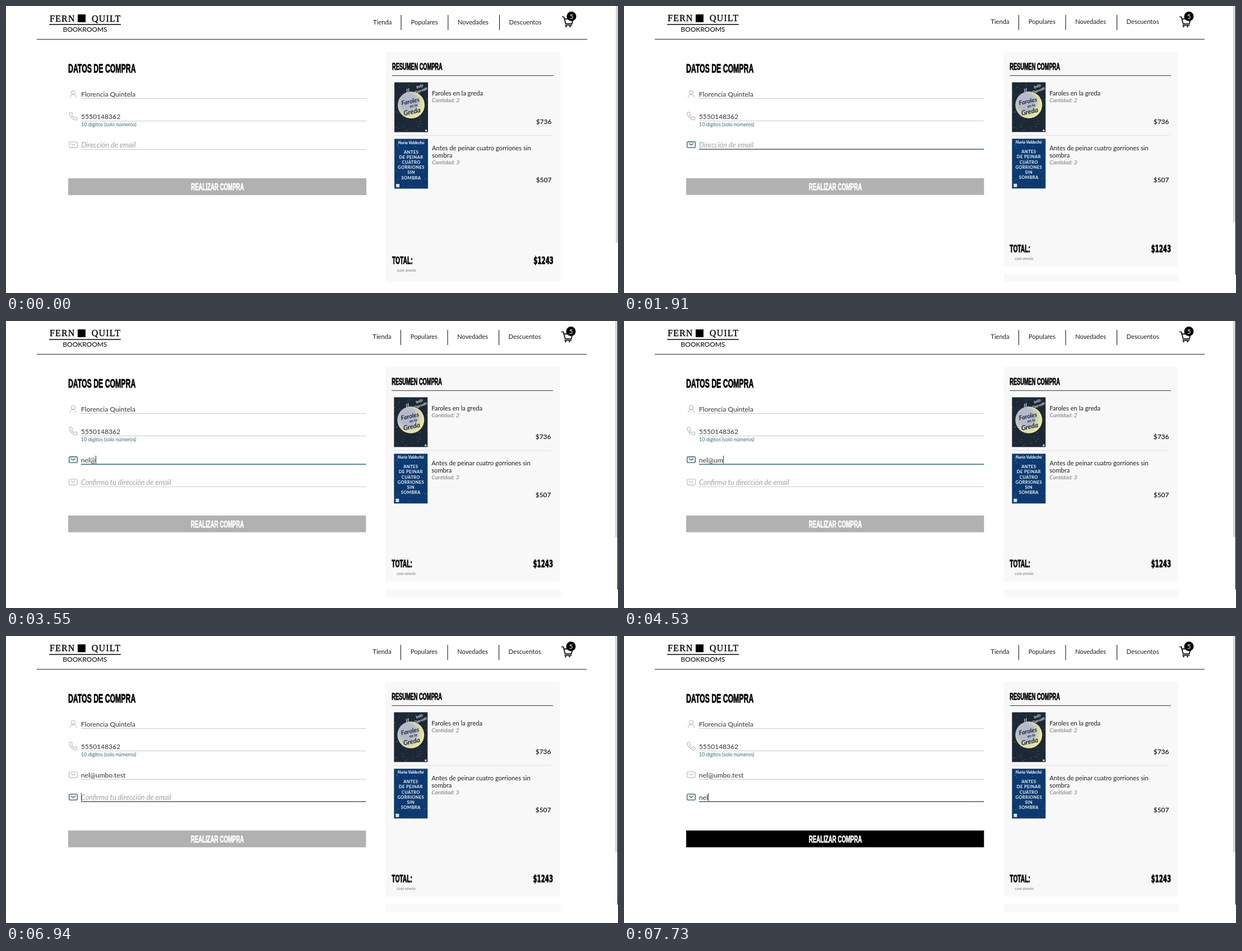
Animation of 1092x513 px, one loop 8000 ms. Source, as an HTML page:

```html
<!DOCTYPE html>
<html lang="es">
<head>
<meta charset="utf-8">
<title>Datos de compra</title>
<style>
  html, body { margin: 0; width: 100%; height: 100%; overflow: hidden; background: #fff; }
  svg { display: block; font: 11.2px Lato, sans-serif; fill: #1c1c1c; }
  .tall { font-family: "Liberation Sans", sans-serif; font-weight: 700; fill: #000; stroke: #000;
          stroke-width: .8; transform-box: fill-box; transform: scaleX(.57); }
  .digits { font-family: "DejaVu Sans", sans-serif; }
  .mid { text-anchor: middle; transform-origin: center; }
  .end { text-anchor: end; transform-origin: right; }
  .white { fill: #fff; stroke: #fff; }
  .brand { font: 16px "Liberation Serif", serif; letter-spacing: 1.2px; fill: #000; stroke: #000; stroke-width: .35; }
  .field { font-size: 12.1px; fill: #333; }
  .hint { font-size: 12.8px; font-style: italic; fill: #a0a0a0; }
  .note { font-size: 10.2px; font-style: italic; fill: #777; }
  .small { font-size: 8.5px; }
  .price { font-size: 12px; font-weight: 500; fill: #000; text-anchor: end; }
  .script { font-style: italic; font-weight: 700; }
  .icon { fill: none; stroke: #b5b5b5; stroke-width: 1.1; stroke-linecap: round; stroke-linejoin: round; }
  .rule { fill: #c8c8c8; }
</style>
</head>
<body>
<svg width="1092" height="513" viewBox="0 0 1092 513">
  <defs>
    <radialGradient id="moon" cx=".38" cy=".4" r=".72">
      <stop offset=".4" stop-color="#b4b9cb"/>
      <stop offset=".75" stop-color="#e3e1a4"/>
      <stop offset="1" stop-color="#f4ee9c"/>
    </radialGradient>
    <g id="mail">
      <rect x="112.7" y="-5" width="14.6" height="10.4" rx="1.6"/>
      <path d="M116.3-1.8 120 1 123.7-1.8"/>
    </g>
  </defs>

  <g id="page">
    <text class="brand" x="78" y="27.5">FERN</text>
    <rect x="128" y="15" width="14" height="14" fill="#000"/>
    <text class="brand" x="205.5" y="27.5" text-anchor="end">QUILT</text>
    <rect x="77" y="32.3" width="128" height="1.5" fill="#000"/>
    <text x="141" y="45.6" font-size="12" text-anchor="middle" fill="#000">BOOKROOMS</text>

    <rect x="55" y="59" width="982" height="1" fill="#222"/>
    <text x="655" y="32.5">Tienda</text>
    <text x="722.5" y="32.5">Populares</text>
    <text x="806" y="32.5">Novedades</text>
    <text x="897.5" y="32.5">Descuentos</text>
    <path d="M705 16v27M788.8 16v27M880.5 16v27" stroke="#000"/>
    <path d="M992 19.5h3.5l3.2 12.3h11l2.3-8.6H997M997.5 34.5h13" fill="none" stroke="#000" stroke-width="1.7"/>
    <circle cx="999.5" cy="36.8" r="1.5"/>
    <circle cx="1006.5" cy="36.8" r="1.5"/>
    <circle cx="1009" cy="18.5" r="8.5" fill="#000"/>
    <text x="1009" y="22.6" font-size="11.5" text-anchor="middle" fill="#fff">5</text>

    <text class="tall" x="111" y="119.5" font-size="21.6">DATOS DE COMPRA</text>
    <g class="icon">
      <circle cx="120" cy="154.6" r="3.4"/>
      <path d="M114.6 164c.2-7.6 10.6-7.6 10.8 0"/>
      <path transform="translate(111.4 188.6) scale(.7)" stroke-width="1.6" d="M22 16.9v3a2 2 0 0 1-2.2 2 19.8 19.8 0 0 1-8.6-3.1 19.5 19.5 0 0 1-6-6A19.8 19.8 0 0 1 2.1 4.2 2 2 0 0 1 4.1 2h3a2 2 0 0 1 2 1.7 12.8 12.8 0 0 0 .7 2.8 2 2 0 0 1-.4 2.1L8.1 9.9a16 16 0 0 0 6 6l1.3-1.3a2 2 0 0 1 2.1-.4 12.8 12.8 0 0 0 2.8.7 2 2 0 0 1 1.7 2z"/>
    </g>
    <text class="field" x="134" y="162">Florencia Quintela</text>
    <rect class="rule" x="134" y="165" width="509" height="1"/>
    <text class="field" x="134" y="202">5550148362</text>
    <rect class="rule" x="134" y="205" width="509" height="1"/>
    <text x="134" y="215.3" font-size="9" fill="#34697a">10 dígitos (solo números)</text>
    <g id="email"></g>
    <g id="confirm"></g>
    <g id="button">
      <rect x="111" y="308" width="532" height="30"/>
      <text class="tall mid white" x="377.5" y="329" font-size="17">REALIZAR COMPRA</text>
    </g>

    <rect id="panel" x="678" y="82" width="311.5" height="411" fill="#f8f8f8"/>
    <text class="tall" x="689" y="114" font-size="16.2">RESUMEN COMPRA</text>
    <rect x="689" y="124" width="288" height="1" fill="#333"/>

    <rect x="693" y="136.5" width="60" height="89" fill="#1c2836"/>
    <g id="stars1"></g>
    <circle cx="723" cy="177" r="24" fill="url(#moon)"/>
    <path d="M715.5 156v-8M718.5 156v-9" stroke="#aab2c0" stroke-width="1.6"/>
    <g class="script" text-anchor="middle" transform="rotate(-12 723 177)" fill="#1c2836">
      <text x="723" y="174" font-size="11">Faroles</text>
      <text x="727" y="181.5" font-size="7">en la</text>
      <text x="722" y="193" font-size="12">Greda</text>
    </g>
    <g class="script" font-size="7.5" transform="rotate(-22 741 146)" fill="#e4e4e0">
      <text x="733" y="145">Inés</text>
      <text x="727" y="153">Dorvan</text>
    </g>
    <rect x="748" y="221" width="3" height="3" fill="#ddd"/>
    <text x="760" y="160">Faroles en la greda</text>
    <text class="note" x="760" y="172">Cantidad: 2</text>
    <text class="price" x="973.5" y="211">$736</text>
    <rect x="693" y="231" width="281" height="1" fill="#dcdcdc"/>

    <rect x="693" y="237.5" width="60" height="89" fill="#0c3a70"/>
    <g id="stars2"></g>
    <text class="script" x="723" y="246.5" font-size="7.3" text-anchor="middle" fill="#fff">Nuria Valdecho</text>
    <g id="cover" font-size="7.6" font-weight="700" letter-spacing=".4" text-anchor="middle" fill="#f4f4f4"></g>
    <rect x="696" y="318" width="6" height="6" fill="#d8e0ea"/>
    <text x="760" y="258">Antes de peinar cuatro gorriones sin</text>
    <text x="760" y="271">sombra</text>
    <text class="note" x="760" y="283">Cantidad: 3</text>
    <text class="price" x="973.5" y="315">$507</text>

    <g id="total">
      <text class="tall" x="689" y="461" font-size="18">TOTAL:</text>
      <text class="tall digits end" x="977" y="461" font-size="18">$1243</text>
      <text class="note small" x="698" y="475">con envío</text>
    </g>
    <rect id="bar" x="1088" y="0" width="4" height="423" fill="#d4d4d4"/>
  </g>
  <g id="after">
    <rect x="678" y="480" width="312" height="13" fill="#f8f8f8"/>
    <rect x="1091" y="0" width="1" height="480" fill="#000"/>
  </g>
</svg>
<script>
const LOOP = 8000;
const EMAIL = "nel@umbo.test";
const KEYS = [2240, 2320, 2480, 3550, 4360, 4530, 4680, 4760, 5000, 5260, 5340, 5410, 5650];
const REPEAT_KEYS = [7360, 7580, 7730];
const CARET_OFF = [[1910, 2240], [3060, 3550], [4120, 4360], [6150, 6730], [7190, 7360]];
const IDLE = [200, 200, 200], ICON = [181, 181, 181], ACTIVE = [38, 86, 98];

const $ = id => document.getElementById(id);
const ramp = (t, start, span) => Math.min(1, Math.max(0, (t - start) / span));
const mix = (a, b, p) => `rgb(${a.map((v, i) => Math.round(v + (b[i] - v) * p))})`;
const show = (el, on) => el.setAttribute("visibility", on ? "visible" : "hidden");
const shiftY = (el, y) => el.setAttribute("transform", `translate(0 ${y})`);

function makeField(id, y, hint) {
  const g = $(id);
  g.innerHTML = `<use href="#mail" class="icon" y="${y}"/>
    <text class="hint" x="134" y="${y + 4.8}">${hint}</text>
    <text class="field" x="134" y="${y + 4.8}"></text>
    <rect x="134" width="509"/>
    <rect y="${y - 7}" width="1" height="14" fill="#222"/>`;
  const [icon, label, text, line, caret] = g.children;
  return (value, focus, caretOn) => {
    text.textContent = value;
    show(label, !value);
    icon.style.stroke = mix(ICON, ACTIVE, focus);
    icon.style.strokeWidth = 1.1 + focus * .2;
    line.setAttribute("fill", mix(IDLE, ACTIVE, focus));
    line.setAttribute("y", y + 8 - focus * .4);
    line.setAttribute("height", 1 + focus * .4);
    const end = value ? text.getComputedTextLength() : 0;
    caret.setAttribute("x", Math.round(134 + end));
    show(caret, caretOn);
  };
}

function stars(id, top, count, color) {
  let seed = count;
  const rnd = () => (seed = seed * 16807 % 2147483647) / 2147483647;
  for (let i = 0; i < 20; i++) rnd();
  let dots = "";
  for (let i = 0; i < count; i++)
    dots += `<circle cx="${694 + rnd() * 58}" cy="${top + 1 + rnd() * 87}" r="${.25 + rnd() * .35}"/>`;
  $(id).innerHTML = `<g fill="${color}">${dots}</g>`;
}

const email = makeField("email", 248, "Dirección de email");
const confirmEmail = makeField("confirm", 288, "Confirma tu dirección de email");
stars("stars1", 136.5, 90, "#a9b4bd");
stars("stars2", 237.5, 80, "#8fb0d4");
$("cover").innerHTML = ["ANTES", "DE PEINAR", "CUATRO", "GORRIONES", "SIN", "SOMBRA"]
  .map((s, i) => `<text x="723" y="${263.5 + i * 9.2}">${s}</text>`).join("");

function draw(t) {
  // the window shrinks a touch and its lower edge moves up
  const resized = t >= 230;
  $("page").setAttribute("transform", `scale(${resized ? .999 : 1})`);
  shiftY($("total"), resized ? -21 : 0);
  $("panel").setAttribute("height", resized ? 384.5 : 411);
  $("bar").setAttribute("height", resized ? 387 : 423);
  show($("after"), resized);

  const typed = keys => EMAIL.slice(0, keys.filter(k => t >= k).length);
  const blink = !CARET_OFF.some(([a, b]) => t >= a && t < b);
  const second = ramp(t, 6700, 240);
  email(typed(KEYS), ramp(t, 1400, 320) * (1 - second), t >= 1440 && t < 6730 && blink);

  const open = t >= KEYS[0];
  $("confirm").style.display = open ? "" : "none";
  if (open) confirmEmail(typed(REPEAT_KEYS), second, t >= 6730 && blink);

  shiftY($("button"), open ? 40 : 0);
  const shade = t < 7360 ? 177 : 98 * (1 - ramp(t, 7360, 160));
  $("button").firstElementChild.setAttribute("fill", mix([0, 0, 0], [255, 255, 255], shade / 255));
}

const start = performance.now();
function tick() {
  draw((performance.now() - start) % LOOP);
  requestAnimationFrame(tick);
}
tick();
</script>
</body>
</html>
```
